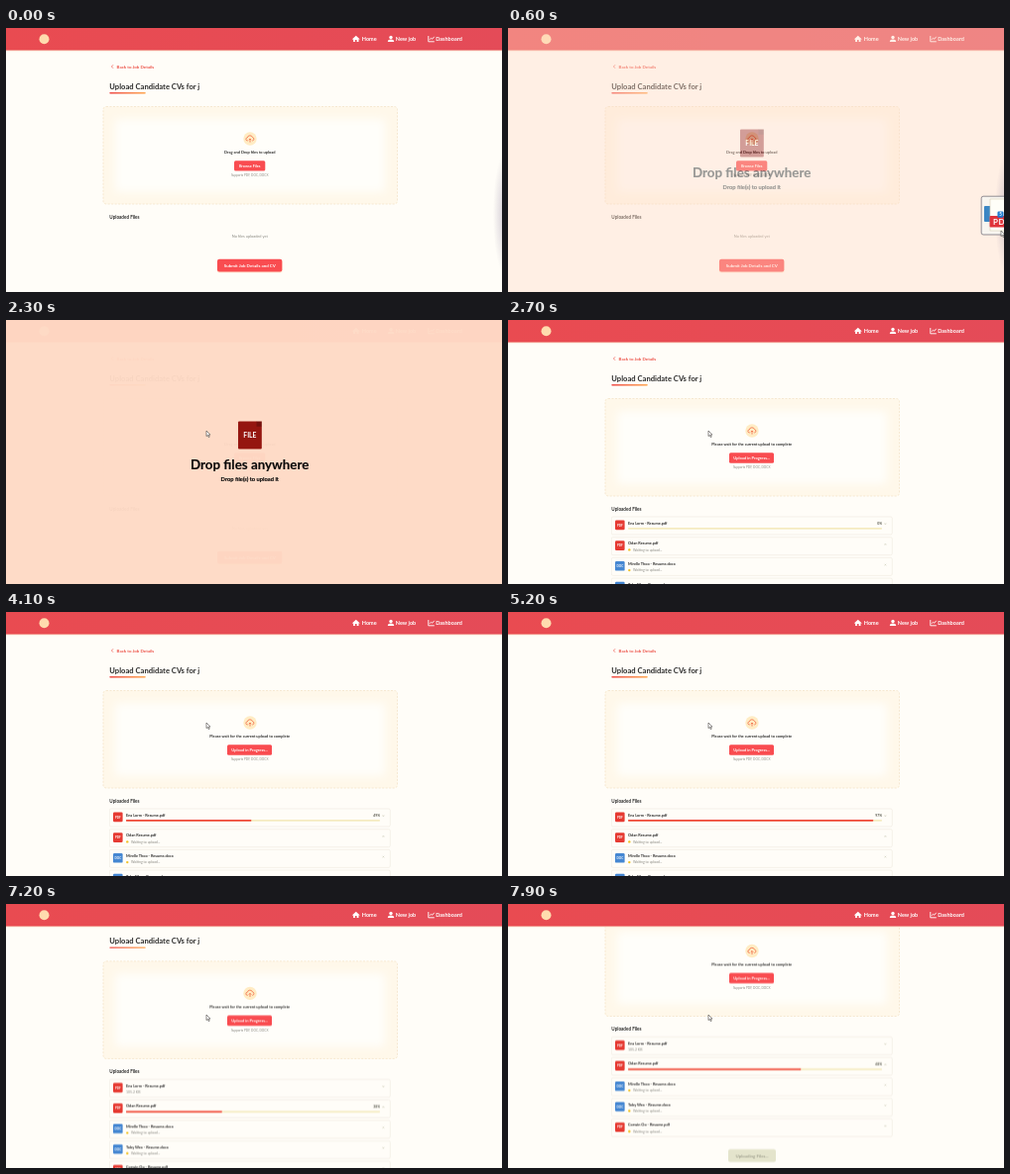
Animation of 500x267 px, one loop 8000 ms. Source, as an HTML page:

```html
<!DOCTYPE html>
<html lang="en">
<head>
<meta charset="utf-8">
<title>Upload CVs</title>
<style>
@property --p { syntax: "<number>"; inherits: true; initial-value: 0; }
@property --n { syntax: "<integer>"; inherits: true; initial-value: 0; }

html, body { margin: 0; width: 100%; height: 100%; overflow: hidden; background: #fffdf8; }
svg { display: block; width: 500px; height: 267px; }
text, .pct { font-family: Lato, "Open Sans", sans-serif; font-weight: 700; fill: #2b2b2b; }
.mid { text-anchor: middle; }
.thin { font-weight: 400; fill: #8a8a84; }
.white { fill: #fff; }
.red { fill: #f94c50; }
.black { fill: #0a0a0a; stroke: #0a0a0a; stroke-width: .15; }
.line { fill: none; stroke: #eeeae0; stroke-width: .6; }

.page, .overlay, .drag, .load1, .load2 { animation: 8s linear infinite; }
.before, .after, .busy1, .done1, .wait2, .busy2, .cargo { animation: 8s step-end infinite; }

.page { animation-name: scroll; }
@keyframes scroll {
  0%, 87.5% { transform: none; animation-timing-function: ease-in-out; }
  93.75%, 100% { transform: translateY(-64.5px); }
}

.overlay { animation-name: fade; }
@keyframes fade {
  0%, 5% { opacity: 0; }
  11%, 30% { opacity: 1; }
  33.5%, 100% { opacity: 0; }
}

.drag { animation-name: drag; }
@keyframes drag {
  0%, 3% { transform: translate(545px, 224px); }
  7.5% { transform: translate(497px, 205px); }
  11.25% { transform: translate(473px, 197px); }
  13.75% { transform: translate(456px, 188px); }
  16.25% { transform: translate(375px, 142px); }
  18.75% { transform: translate(256px, 84px); }
  21.25% { transform: translate(170px, 76px); }
  22.5% { transform: translate(176px, 95px); }
  24%, 100% { transform: translate(202px, 112px); }
}
.cargo { animation-name: upTo25; }
@keyframes upTo25 { 0% { opacity: 1; } 25%, 100% { opacity: 0; } }

.before { animation-name: upTo30; }
.after { animation-name: from30; }
@keyframes upTo30 { 0% { opacity: 1; } 30%, 100% { opacity: 0; } }
@keyframes from30 { 0% { opacity: 0; } 30%, 100% { opacity: 1; } }

.busy1 { animation-name: upTo67; }
.done1 { animation-name: from67; }
@keyframes upTo67 { 0% { opacity: 1; } 67.5%, 100% { opacity: 0; } }
@keyframes from67 { 0% { opacity: 0; } 67.5%, 100% { opacity: 1; } }

.wait2 { animation-name: upTo79; }
.busy2 { animation-name: from79; }
@keyframes upTo79 { 0% { opacity: 1; } 79%, 100% { opacity: 0; } }
@keyframes from79 { 0% { opacity: 0; } 79%, 100% { opacity: 1; } }

.load1 { animation-name: load1; }
.load2 { animation-name: load2; }
@keyframes load1 {
  0%, 36.9% { --p: 0; --n: 0; }
  66%, 100% { --p: 100; --n: 100; }
}
@keyframes load2 {
  0%, 79.1% { --p: 0; --n: 0; }
  100% { --p: 72.4; --n: 72; }
}
.fill { fill: #f0483a; transform-box: fill-box; transform-origin: 0 0; transform: scaleX(calc(var(--p) / 100)); }
.pct { counter-reset: n var(--n); font-size: 3.4px; line-height: 5px; text-align: right; color: #55554a; }
.pct::after { content: counter(n) "%"; }
</style>
</head>
<body>
<svg viewBox="0 0 500 267">
  <defs>
    <linearGradient id="rule"><stop stop-color="#ee4a48"/><stop offset="1" stop-color="#ffa850"/></linearGradient>
    <linearGradient id="bar"><stop stop-color="#e94b51"/><stop offset="1" stop-color="#e44b58"/></linearGradient>
    <radialGradient id="shade"><stop stop-color="#9a8fa8" stop-opacity=".45"/><stop offset="1" stop-color="#9a8fa8" stop-opacity="0"/></radialGradient>
    <filter id="soft" x="-10%" y="-20%" width="120%" height="140%"><feGaussianBlur stdDeviation="4"/></filter>
  </defs>
  <rect width="500" height="267" fill="#fffdf8"/>

  <g class="page">
    <path d="M108 37.3l-1.6 1.7 1.6 1.7" fill="none" stroke="#ec4f45" stroke-width=".7"/>
    <text x="111.6" y="40.6" font-size="4.45" style="fill:#ec4f45">Back to Job Details</text>
    <text x="104.3" y="61.6" font-size="7.63">Upload Candidate CVs for j</text>
    <rect x="104.3" y="65" width="36.5" height="1.4" rx=".7" fill="url(#rule)"/>

    <rect x="98" y="79.5" width="296.5" height="98.5" rx="3" fill="#fff8ea" stroke="#f4e4c8" stroke-width=".8" stroke-dasharray="2 1.5"/>
    <rect x="110" y="92" width="272" height="74" rx="4" fill="#fffefa" filter="url(#soft)"/>
    <circle cx="246" cy="112" r="6.7" fill="#ffecc4"/>
    <path d="M243.8 113.9h-.4a1.5 1.5 0 0 1-.1-3 2.7 2.7 0 0 1 5.2-.3 1.7 1.7 0 0 1 .2 3.3h-.5M246 115.6v-3.6m-1.2 1.2l1.2-1.2 1.2 1.2" fill="none" stroke="#f0643e" stroke-width=".75"/>
    <text class="mid thin" x="245.7" y="150.2" font-size="3.1">Supports PDF, DOC, DOCX</text>
    <text x="104.3" y="192.8" font-size="4.6">Uploaded Files</text>

    <g class="before">
      <text class="mid" x="245.8" y="127.4" font-size="3.95">Drag and Drop files to upload</text>
      <rect class="red" x="230" y="134.3" width="31.3" height="10.3" rx="1.5"/>
      <text class="mid white" x="245.7" y="140.8" font-size="3.85">Browse Files</text>
      <text class="mid thin" x="245.8" y="212" font-size="3.9">No files uploaded yet</text>
      <rect x="212.7" y="234.6" width="66" height="13" rx="2.5" fill="#ffe2cc"/>
      <rect class="red" x="213" y="233.8" width="65.3" height="12.7" rx="2"/>
      <text class="mid white" x="245.8" y="241.8" font-size="4.45">Submit Job Details and CV</text>
    </g>

    <g class="after">
      <text class="mid" x="245.7" y="127.4" font-size="3.95">Please wait for the current upload to complete</text>
      <rect class="red" x="223" y="134.3" width="45" height="10.5" rx="1.5"/>
      <text class="mid white" x="245.6" y="140.9" font-size="4.05">Upload in Progress...</text>
      <g id="rows"></g>
      <rect x="222" y="312.6" width="48" height="13" rx="2" fill="#e4e4cc"/>
      <text class="mid" x="246" y="320.6" font-size="4.4" style="fill:#a2a290">Uploading Files...</text>
    </g>
  </g>

  <rect y="22" width="500" height="1.4" fill="#fbe2cc"/>
  <rect width="500" height="22.5" fill="url(#bar)"/>
  <circle cx="38.5" cy="11.3" r="5" fill="#ffdcae"/>
  <g class="white">
    <path d="M349 11.2l3.8-3.4 3.8 3.4-.5.5-.6-.5v2.9h-1.9v-2h-1.6v2h-1.9v-2.9l-.6.5z"/>
    <circle cx="388" cy="9.5" r="1.7"/><path d="M384.8 14c0-3.2 6.4-3.2 6.4 0z"/>
    <path d="M425.8 8v5.8h6M427 11.8l1.5-1.6 1.2 1 2-2.4" fill="none" stroke="#fff" stroke-width=".9"/>
    <g font-size="5.5">
      <text class="white" x="358.8" y="13">Home</text>
      <text class="white" x="392.8" y="13">New job</text>
      <text class="white" x="433.2" y="13">Dashboard</text>
    </g>
  </g>

  <g class="overlay">
    <rect width="500" height="267" fill="#fedac6" fill-opacity=".97"/>
    <path d="M235 102.5h17.5l5.3 5.3v21.7q0 1-1 1h-21.8q-1 0-1-1v-26q0-1 1-1z" fill="#951610"/>
    <path d="M252.5 102.5h5.3v5.3h-5.3z" fill="#74100c"/>
    <text class="mid white" x="245.9" y="119" font-size="6.7">FILE</text>
    <text class="mid black" x="245.7" y="151.3" font-size="13.35">Drop files anywhere</text>
    <text class="mid black" x="245.8" y="163.3" font-size="5.75">Drop file(s) to upload it</text>
  </g>
  <ellipse class="cargo" cx="503" cy="188" rx="12" ry="62" fill="url(#shade)"/>

  <g class="drag">
    <g class="cargo">
      <rect x="-19.8" y="-34.8" width="38.8" height="38.8" rx="2" fill="#f8f5f0" stroke="#74727c" stroke-width=".8"/>
      <rect x="-17" y="-25" width="9" height="16" rx="1" fill="#3a86c4"/>
      <path d="M-11-32H5l7 7V0h-23z" fill="#fffef8" stroke="#d9d2b8" stroke-width=".6"/>
      <path d="M5-32v7h7z" fill="#f0e8c4"/>
      <rect x="-11.4" y="-15" width="23.6" height="11.6" rx="1" fill="#e0333a"/>
      <text class="mid white" x=".8" y="-6.2" font-size="8" letter-spacing=".7">PDF</text>
      <rect x="-3.5" y="-19.5" width="6" height="6.3" rx="1.2" fill="#1c7ad0"/>
      <text class="mid white" x="-.5" y="-14.7" font-size="4.6">5</text>
      <rect x="4" y="5" width="21" height="8" rx="1" fill="#fffdfa" stroke="#ddd6d0" stroke-width=".4"/>
      <path d="M6.2 9h3.6M8 7.2v3.6" stroke="#55a83a" stroke-width="1.1"/>
      <text class="thin" x="11.3" y="10.8" font-size="4.7" style="fill:#4560a8">Copy</text>
    </g>
    <path d="M0 0v5.6l1.3-1.2 1 2.2.9-.4-1-2.1h1.8z" fill="#fff" stroke="#45423e" stroke-width=".6"/>
  </g>
</svg>
<script>
const files = [
  "Ena Lorm - Resume.pdf",
  "Odan Resume.pdf",
  "Mirelle Thoo - Resume.docx",
  "Toby Wex - Resume.docx",
  "Corwin Oo - Resume.pdf"
];
const pitch = 20.7;

const waiting = cls => `<g class="${cls}">
  <circle cx="122.3" cy="211.7" r="1.2" fill="#f0c22a"/>
  <text class="thin" x="126" y="213" font-size="3.45">Waiting to upload...</text></g>`;

const loading = i => `<g class="busy${i}"><g class="load${i}">
  <rect x="121" y="210" width="256" height="1.7" rx=".8" fill="#f5ebc0"/>
  <rect class="fill" x="121" y="210" width="256" height="1.7" rx=".8"/>
  <foreignObject x="357" y="204" width="20" height="5"><div class="pct"></div></foreignObject></g></g>`;

const size = `<text class="thin done1" x="121" y="213" font-size="3.5">105.2 KB</text>`;

const state = i => i === 0 ? loading(1) + size
  : i === 1 ? waiting("wait2") + loading(2)
  : waiting("");

document.getElementById("rows").innerHTML = files.map((name, i) => {
  const doc = name.endsWith("docx");
  return `<g transform="translate(0 ${i * pitch})">
    <rect class="line" x="104.3" y="199" width="283" height="18" rx="1.5"/>
    <rect x="108" y="202.6" width="9.6" height="9.6" rx="1.2" fill="${doc ? "#4587d2" : "#e63a32"}"/>
    <text class="mid white" x="112.8" y="208.5" font-size="3">${doc ? "DOC" : "PDF"}</text>
    <text x="121" y="206.7" font-size="3.85">${name}</text>
    <path d="M379.6 205.4l1.6 1.6m0-1.6l-1.6 1.6" stroke="#b9b8a0" stroke-width=".4"/>
    ${state(i)}</g>`;
}).join("");
</script>
</body>
</html>
```
